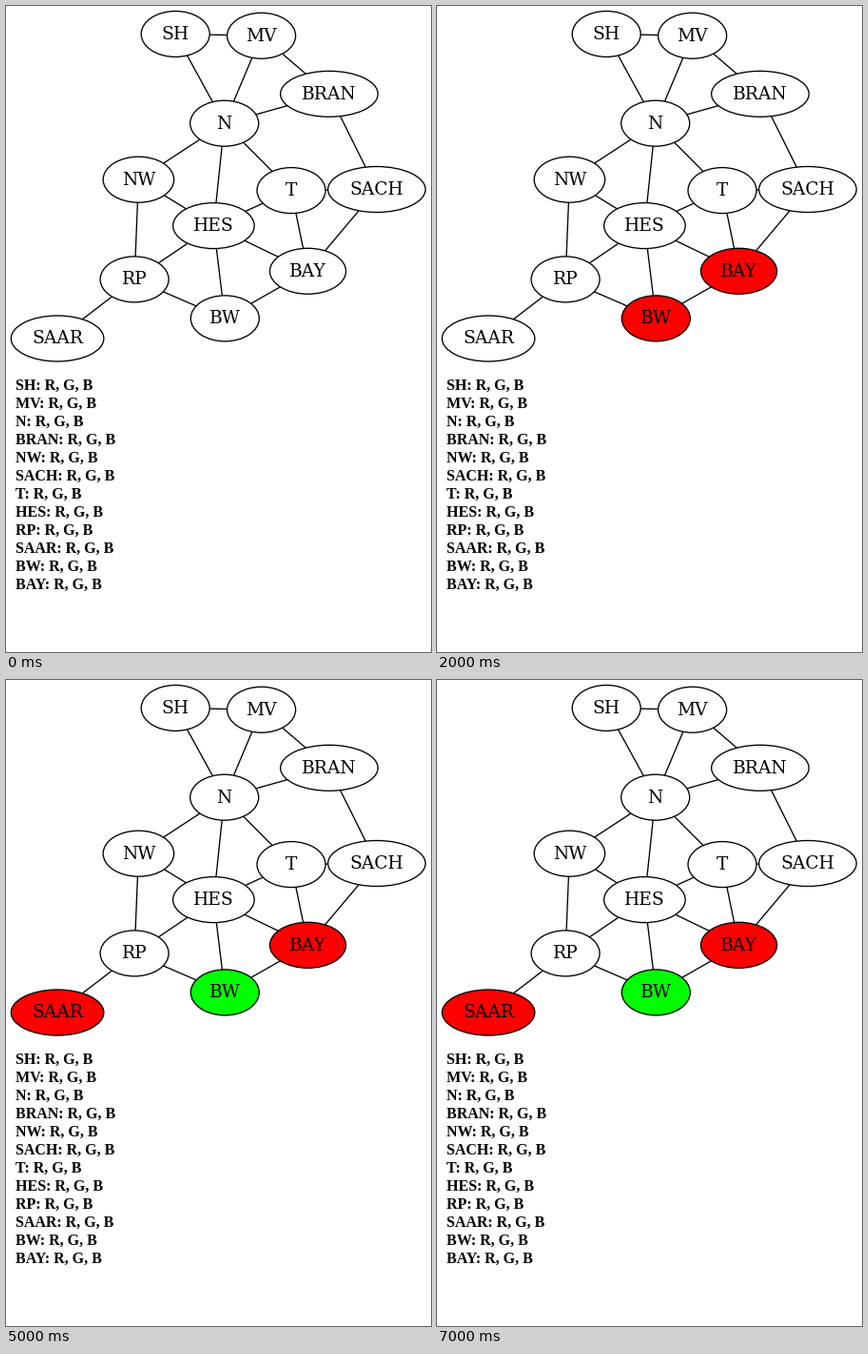
Write a matplotlib script that moves like this. It is 447 by 678 pixels and loops after 8 s.

```python
import matplotlib
import matplotlib.pyplot as plt
from matplotlib.animation import FuncAnimation
from matplotlib.patches import Ellipse

matplotlib.rcParams["toolbar"] = "None"

W, H, DPI = 447, 678, 64
PT = 72 / DPI  # points per pixel
WHITE, RED, GREEN = "#ffffff", "#ff0000", "#00ff00"

# name: centre x, centre y, width
NODES = {
    "SH": (178.2, 29.4, 72),
    "MV": (268.6, 31.2, 72),
    "N": (229.7, 123.2, 72),
    "BRAN": (339.9, 92.3, 102.5),
    "NW": (139.4, 182.2, 74.5),
    "SACH": (389.9, 192.5, 102.5),
    "T": (300.0, 193.6, 72),
    "HES": (218.4, 230.6, 85.5),
    "RP": (135.1, 286.9, 72),
    "SAAR": (54.1, 349.0, 97.5),
    "BW": (230.3, 327.9, 72),
    "BAY": (317.5, 278.3, 80),
}

NEIGHBOURS = {
    "SH": "MV N",
    "MV": "N BRAN",
    "BRAN": "N SACH",
    "N": "NW HES T",
    "NW": "HES RP",
    "T": "HES SACH BAY",
    "SACH": "BAY",
    "HES": "BAY RP BW",
    "RP": "SAAR BW",
    "BW": "BAY",
}

# Backtracking search, one assignment or retraction per second
STEPS = [
    {},
    {"BAY": RED},
    {"BAY": RED, "BW": RED},
    {"BAY": RED},
    {"BAY": RED, "BW": GREEN},
    {"BAY": RED, "BW": GREEN, "SAAR": RED},
    {"BAY": RED, "BW": GREEN, "SAAR": RED, "RP": RED},
    {"BAY": RED, "BW": GREEN, "SAAR": RED},
]

fig = plt.figure(figsize=(W / DPI, H / DPI), dpi=DPI, facecolor="white")
ax = fig.add_axes([0, 0, 1, 1])
ax.set_xlim(0, W)
ax.set_ylim(H, 0)
ax.axis("off")

for a, others in NEIGHBOURS.items():
    for b in others.split():
        (x1, y1, _), (x2, y2, _) = NODES[a], NODES[b]
        ax.plot([x1, x2], [y1, y2], color="black", lw=1.33 * PT,
                snap=False, zorder=1)

ovals = {}
for name, (x, y, w) in NODES.items():
    ovals[name] = ax.add_patch(Ellipse((x, y), w, 48, fc=WHITE, ec="black",
                                       lw=1.33 * PT, zorder=2))
    ax.text(x, y + 5.4, name, family="DejaVu Serif", size=18.67 * PT,
            ha="center", va="baseline", zorder=3)

for i, name in enumerate(NODES):
    ax.text(10, 403 + 19 * i, f"{name}: R, G, B", family="Liberation Serif",
            weight="bold", size=16 * PT, ha="left", va="baseline")


def update(step):
    for name, oval in ovals.items():
        oval.set_facecolor(STEPS[step].get(name, WHITE))
    return list(ovals.values())


anim = FuncAnimation(fig, update, frames=len(STEPS), interval=1000,
                     repeat=True, repeat_delay=0, blit=False)
plt.show()
```
